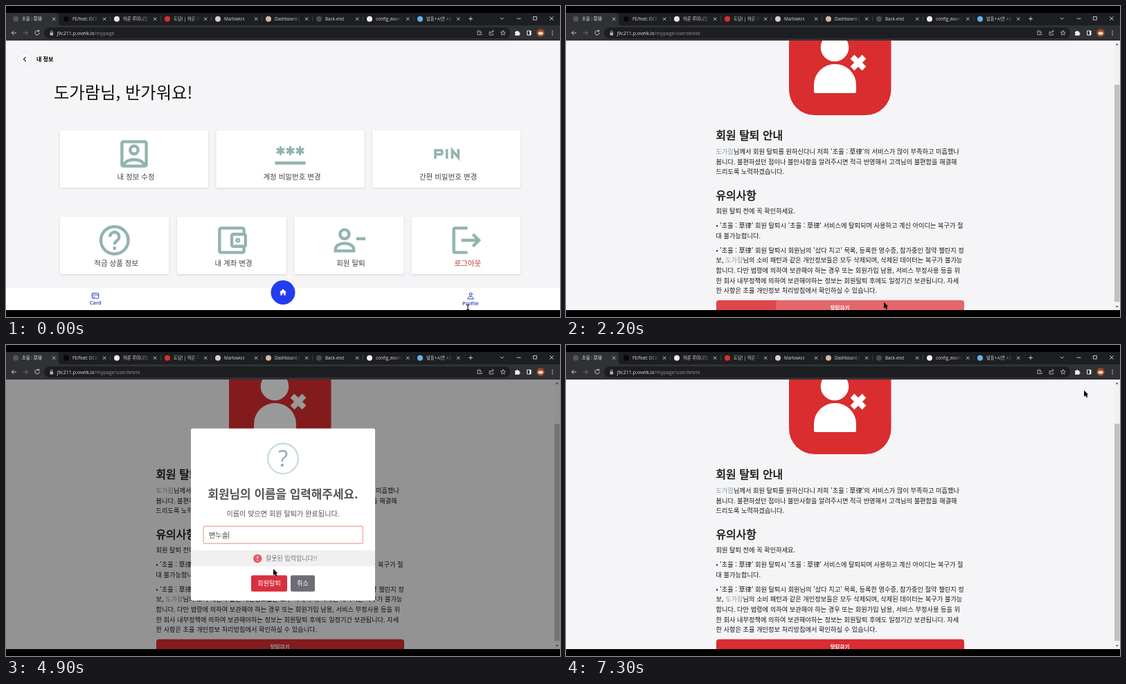
An HTML page that plays this animation: 800x450 px, repeating every 7.4 s.

```html
<!DOCTYPE html>
<html lang="ko">
<head>
<meta charset="utf-8">
<style>
html, body { margin: 0; width: 100%; height: 100%; overflow: hidden; background: #000; }
svg { display: block; font-family: "Noto Sans CJK KR", "Noto Sans CJK", "Noto Sans", sans-serif; }
#stage { width: 100vw; height: 100vh; }
text { white-space: pre; }
.ui { font-family: "Open Sans", "Noto Sans CJK KR", sans-serif; }
.mid { text-anchor: middle; }
.line { fill: none; stroke-linecap: round; stroke-linejoin: round; }
.copy { font-size: 9.23px; fill: #1a1a1a; }
.head { font-size: 15.9px; fill: #111; stroke: #111; stroke-width: .45px; }
.name { fill: #85a09b; }
.icon { fill: none; stroke: #92b4af; stroke-width: 2; }
.card { fill: #fff; filter: drop-shadow(0 1px 1.5px #0002); }

#home, #leave, #press, #cursor, #arrow, #beam, #scroll, #thumb, #shade, #modal, .err, .ok, .up, .down {
  animation: 7.4s linear infinite;
}
#home { animation-name: home; animation-timing-function: step-end; }
#leave { animation-name: leave; animation-timing-function: step-end; }
#beam { animation-name: beam; animation-timing-function: step-end; }
#arrow { animation-name: arrow; animation-timing-function: step-end; }
#press { animation-name: press; animation-timing-function: step-end; }
.err { animation-name: err; animation-timing-function: step-end; }
.ok { animation-name: ok; animation-timing-function: step-end; }
.up { animation-name: up; animation-timing-function: step-end; }
.down { animation-name: down; animation-timing-function: step-end; }
#scroll { animation-name: scroll; animation-timing-function: ease-in-out; }
#thumb { animation-name: thumb; animation-timing-function: ease-in-out; }
#cursor { animation-name: cursor; animation-timing-function: ease-in-out; }
#shade { animation-name: shade; }
#modal { animation-name: modal; transform-origin: 400px 245px; }

@keyframes home { 0% { opacity: 1 } 9.46%, 100% { opacity: 0 } }
@keyframes leave { 0% { opacity: 0 } 9.46%, 100% { opacity: 1 } }
@keyframes beam { 0% { opacity: 1 } 2%, 100% { opacity: 0 } }
@keyframes arrow { 0% { opacity: 0 } 2%, 100% { opacity: 1 } }
@keyframes press { 0% { opacity: 0 } 29% { opacity: 1 } 30.95%, 100% { opacity: 0 } }
@keyframes err { 0% { opacity: 0 } 59.4%, 100% { opacity: 1 } }
@keyframes ok { 0% { opacity: 1 } 59.4%, 100% { opacity: 0 } }
@keyframes up { 0% { transform: none } 59.4%, 100% { transform: translateY(-16px) } }
@keyframes down { 0% { transform: none } 59.4%, 100% { transform: translateY(16px) } }
@keyframes scroll { 0%, 23.6% { transform: none } 27.7%, 100% { transform: translateY(-60px) } }
@keyframes thumb { 0%, 23.6% { transform: none } 27.7%, 100% { transform: translateY(53px) } }
@keyframes shade { 0%, 30.95% { opacity: 0 } 32.3%, 78.4% { opacity: 1 } 79.8%, 100% { opacity: 0 } }
@keyframes modal {
  0%, 30.9% { opacity: 0; transform: scale(.7) }
  30.95% { opacity: 1; transform: scale(.7) }
  32.8% { transform: scale(1.05) }
  34.2% { transform: scale(.95) }
  35%, 78.4% { opacity: 1; transform: none }
  80.4%, 100% { opacity: 0; transform: scale(.5) }
}
@keyframes cursor {
  0%, 1.3% { transform: translate(667px, 431px) }
  7.5%, 12.2% { transform: translate(497px, 354px) }
  19%, 23% { transform: translate(618.5px, 304.5px) }
  29%, 52.7% { transform: translate(459px, 428.5px) }
  58.1%, 70% { transform: translate(386px, 324px) }
  77%, 85% { transform: translate(391.5px, 333.5px) }
  96%, 100% { transform: translate(748px, 65.5px) }
}
</style>
</head>
<body>
<svg id="stage" viewBox="0 0 800 450">
  <defs>
    <linearGradient id="fade"><stop stop-color="#1d1e21" stop-opacity="0"/><stop offset="1" stop-color="#1d1e21"/></linearGradient>
  </defs>
  <rect width="800" height="450"/>

  <svg y="50" width="800" height="390" viewBox="0 50 800 390">
    <rect y="50" width="800" height="390" fill="#f5f4f6"/>
    <g id="home">
      <circle cx="27" cy="77" r="10" fill="#f7f6f8" stroke="#e6e5e8"/>
      <path class="line" d="M28.3 74.2 25.5 77l2.8 2.8" stroke="#222" stroke-width="1.2"/>
      <text x="44" y="79.8" font-size="8" font-weight="700">내 정보</text>
      <text x="69" y="133.5" font-size="24.3" fill="#111">도가람님, 반가워요!</text>
      <g id="cards"></g>
      <rect y="408" width="800" height="32" fill="#fff"/>
      <circle cx="400" cy="414.5" r="17.5" fill="#223cf0"/>
      <path d="M400 409.5l-5.2 4.8h1.5v4.2h2.6v-3h2.2v3h2.6v-4.2h1.5z" fill="#fff"/>
      <g class="line" stroke="#2a3ec4">
        <rect x="124.3" y="415.5" width="9.5" height="7.5" rx="1"/>
        <path d="M124.3 418h9.5M126 421h2"/>
        <circle cx="671" cy="417" r="2"/>
        <path d="M666.8 423.5c0-4.2 8.4-4.2 8.4 0z"/>
      </g>
      <g class="ui mid" font-size="7.5" fill="#2a3ec4" font-weight="600">
        <text x="129.3" y="432">Card</text><text x="670.8" y="432.8">Profile</text>
      </g>
    </g>

    <g id="leave">
      <rect y="50" width="800" height="390" fill="#f5f4f6"/>
      <g id="scroll">
        <circle cx="212.5" cy="63" r="10" fill="#f7f6f8" stroke="#e6e5e8"/>
        <path class="line" d="M213.8 60.2 211 63l2.8 2.8" stroke="#222" stroke-width="1.2"/>
        <text x="229" y="65.8" font-size="8" font-weight="700">회원 탈퇴</text>
        <rect x="322" y="67.5" width="147.5" height="150.5" rx="37" fill="#d92d2f"/>
        <g fill="#fff">
          <circle cx="388" cy="120" r="20.3"/>
          <path d="M358 184v-10a30.5 30 0 0 1 61 0v10q0 2-2 2h-57q-2 0-2-2z"/>
          <path d="M413.5 133.5l17 17m0-17-17 17" stroke="#fff" stroke-width="8.2"/>
        </g>
        <g id="copy"></g>
        <rect x="217" y="485.7" width="358" height="23" rx="4" fill="#d92d33"/>
        <text class="mid" x="395.5" y="500" font-size="7.5" font-weight="700" fill="#fff">탈퇴하기</text>
        <g id="press" fill="#fff">
          <rect x="217" y="485.7" width="86" height="23" rx="4" opacity=".12"/>
          <rect x="303" y="485.7" width="272" height="23" rx="4" opacity=".28"/>
        </g>
      </g>
      <rect x="791.5" y="50" width="8.5" height="390" fill="#f1f1f1"/>
      <rect id="thumb" x="792" y="61" width="7.5" height="314" fill="#c1c1c1"/>
      <path d="M793.8 56.5h4l-2-2.5zM793.8 434h4l-2 2.5z" fill="#555"/>
    </g>

    <rect id="shade" y="50" width="800" height="390" fill="#000" fill-opacity=".4"/>
    <g id="modal">
      <rect class="ok" x="267" y="136.7" width="266" height="216.5" rx="2.5" fill="#fff"/>
      <rect class="err" x="267" y="120.7" width="266" height="249" rx="2.5" fill="#fff"/>
      <g class="up mid">
        <circle cx="400" cy="180.3" r="21.8" fill="none" stroke="#c9dcdf" stroke-width="2.3"/>
        <text x="400" y="192" font-size="33" fill="#87adb2" font-family="Open Sans, sans-serif">?</text>
        <text x="400" y="237.5" font-size="16.9" font-weight="700" fill="#545454">회원님의 이름을 입력해주세요.</text>
        <text x="400" y="263.7" font-size="10.15" fill="#545454">이름이 맞으면 회원 탈퇴가 완료됩니다.</text>
        <rect class="ok" x="285" y="278" width="230.5" height="25.3" rx="2" fill="#fff" stroke="#b4d0de" stroke-width="2.2"/>
        <rect class="err" x="285.2" y="278.3" width="230" height="25" rx="2" fill="#fff" stroke="#eeb3a9" stroke-width="1.4"/>
        <text x="293" y="294.8" font-size="10.15" fill="#444" style="text-anchor:start"><tspan id="done"></tspan><tspan id="composing" text-decoration="underline"></tspan></text>
        <rect id="caret" y="286" width=".7" height="10.5" fill="#333"/>
      </g>
      <g class="err">
        <rect x="267" y="297" width="266" height="23.3" fill="#f0f0f0"/>
        <circle cx="363.2" cy="309" r="6.2" fill="#e85a62"/>
        <path d="M363.2 305.6v4" stroke="#fff" stroke-width="1.3"/><circle cx="363.2" cy="311.8" r=".8" fill="#fff"/>
        <text x="375" y="312.2" font-size="9" fill="#777">잘못된 입력입니다!!</text>
      </g>
      <g class="down mid" font-size="9.15" fill="#fff">
        <rect x="354" y="317.3" width="52" height="23.5" rx="2.3" fill="#d9303f"/>
        <text x="380" y="332.2">회원탈퇴</text>
        <rect x="411" y="317.3" width="35" height="23.5" rx="2.3" fill="#6e6d76"/>
        <text x="428.5" y="332.2">취소</text>
      </g>
    </g>
  </svg>

  <rect y="10" width="800" height="18" fill="#1d1e21"/>
  <path d="M0 10H72q4 0 4 4v10q0 4 4 4H800V50H0z" fill="#303135"/>
  <path d="M76 10H800V28H80q-4 0-4-4V14q0-4-4-4z" fill="#1d1e21"/>
  <g id="tabs" class="ui" font-size="6.3" fill="#dcdcde"></g>
  <g class="line" stroke="#d8d8da" stroke-width=".9">
    <path d="M668.5 18.5h5m-2.5-2.5v5M714 17l2.3 2.3 2.3-2.3M738 18.2h5M785.5 15.5l5 5m0-5-5 5"/>
    <rect x="761.8" y="15.5" width="4.6" height="4.6"/>
    <path d="M14.5 39H8.3m2.8-2.8L8.3 39l2.8 2.8M47.5 36.5a3.2 3.2 0 1 0 .8 2.5m-.6-4.2v2h-2"/>
    <path d="M25 39h6.2m-2.8-2.8 2.8 2.8-2.8 2.8" stroke="#77787c"/>
  </g>
  <rect x="55" y="31" width="673" height="16" rx="8" fill="#1d1e21"/>
  <rect x="63.5" y="38.5" width="4.6" height="4" rx=".5" fill="#b5b6b9"/>
  <g class="line" stroke="#b5b6b9" stroke-width=".9">
    <path d="M64.5 38.5v-1.2a1.3 1.3 0 0 1 2.6 0v1.2"/>
    <path d="M684 36h-3v5.5h6V40m-2-4v3m-1.3-1.2 1.3 1.3 1.3-1.3M700 37.5h-2v4.5h5.5v-2m-3.5 0c0-2.5 1.5-3.5 4-3.5m-1.5-1.5 1.5 1.5-1.5 1.5"/>
    <path d="M717.7 35.5l1 2.3 2.5.2-1.9 1.7.6 2.4-2.2-1.3-2.2 1.3.6-2.4-1.9-1.7 2.5-.2z"/>
  </g>
  <text class="ui" x="73.5" y="41.7" font-size="7.05" fill="#e4e4e6">j9c211.p.ovelk.io<tspan id="path" fill="#8e9094"></tspan></text>
  <path d="M735 37h2a1.2 1.2 0 0 1 2.4 0h2v2a1.2 1.2 0 0 1 0 2.4v1.4h-6.4v-2a1.2 1.2 0 0 0 0-2z" fill="#eee"/>
  <path d="M752.5 36h5.5v6h-5.5z" fill="none" stroke="#eee"/><path d="M756 36h2v6h-2z" fill="#eee"/>
  <circle cx="772" cy="39" r="5.7" fill="#a54b24"/><ellipse cx="772" cy="39.5" rx="3.6" ry="2.3" fill="#ecd9c6"/>
  <g fill="#d8d8da"><circle cx="789" cy="36.3" r=".8"/><circle cx="789" cy="39" r=".8"/><circle cx="789" cy="41.7" r=".8"/></g>

  <g id="cursor">
    <path id="beam" d="M-2 1.5h4M0 1.5v7M-2 8.5h4" stroke="#111" stroke-width="1.2"/>
    <path id="arrow" d="M0 0v9.2l2-1.7 1.5 3 1.8-.8-1.4-3 2.6-.2z" fill="#0a0a0a"/>
  </g>
</svg>
<script>
const $ = id => document.getElementById(id);
const NAME = '<tspan class="name">도가람</tspan>';
const BRAND = "'초율 : 草律'";

const tabs = [
  ['#55565a', '초율 : 草律'], ['#08080a', 'FE/feat: OCR 인식'], ['#eeeeee', '하론 루미나탭 구매'],
  ['#d5302f', '도담! | 하론 루미'], ['#d4d4d4', 'Marlowick'], ['#d9b9a6', 'Dashboard [Jenk'],
  ['#4b4c50', 'Back-end'], ['#f2f2f2', 'config_example'], ['#62b4e6', '발표+시연 시나리']
];
$('tabs').innerHTML = tabs.map(([color, title], i) => {
  const x = 14 + i * 73;
  const fade = i ? `<rect x="${x + 34}" y="12" width="13" height="14" fill="url(#fade)"/>
    <rect x="${x + 47}" y="12" width="24" height="14" fill="#1d1e21"/>` : '';
  const divider = i && i < 8 ? `<path d="M${x + 63.5} 14.5v8" stroke="#4c4d51" stroke-width=".7"/>` : '';
  return `<circle cx="${x}" cy="18.7" r="4" fill="${color}"/><text x="${x + 9}" y="21">${title}</text>${fade}
    <path class="line" d="M${x + 53.3} 16.8l3.8 3.8m0-3.8-3.8 3.8" stroke="#d8d8da" stroke-width=".9"/>${divider}`;
}).join('');

const star = x => [0, 60, 120].map(a => `<path d="M${x} 7v5.8" stroke-width="1.5" transform="rotate(${a} ${x} 9.9)"/>`).join('');
// Icons use a 24-unit grid centred on the card.
const cards = [
  [78, 180, 214, '내 정보 수정', '<rect x="4" y="4" width="16" height="16" rx="1"/><circle cx="12" cy="9.4" r="2.6"/><path d="M5 19.5c2-5 12-5 14 0"/>'],
  [303.5, 180, 214, '계정 비밀번호 변경', star(5.6) + star(12) + star(18.4) + '<path d="M2 18h20"/>'],
  [529, 180, 214, '간편 비밀번호 변경', '<path d="M4.7 15.2V9.6h3.5q1 0 1 1v.7q0 1-1 1H4.7M12.3 8.8v6.4M15.8 15.2V9.6l4 4.8V8.8" stroke-width="1.6"/>'],
  [78, 305, 157.5, '적금 상품 정보', '<circle cx="12" cy="12" r="9"/><path d="M9 9.8a3 3 0 1 1 4.6 2.4c-1 .7-1.6 1.2-1.6 2.5M12 16.2v2"/>'],
  [247, 305, 158, '내 계좌 변경', '<rect x="4" y="4" width="16" height="16" rx="1"/><rect x="12" y="8" width="9" height="8" rx="1" fill="#fff"/><circle cx="16" cy="12" r="1" stroke-width="1.2"/>'],
  [416.5, 305, 158, '회원 탈퇴', '<circle cx="9" cy="8" r="3"/><path d="M3 19v-1c0-3 4-4 6-4s6 1 6 4v1zM16.7 11h6"/>'],
  [585.5, 305, 157.5, '로그아웃', '<path d="M13 4H5q-1 0-1 1v14q0 1 1 1h8M9 12h11M16.5 8l4 4-4 4"/>']
];
$('cards').innerHTML = cards.map(([x, y, w, label, art]) => {
  const cx = x + w / 2;
  return `<rect class="card" x="${x}" y="${y}" width="${w}" height="83" rx="2"/>
    <g class="icon" transform="translate(${cx - 26.4} ${y + 7.6}) scale(2.2)">${art}</g>
    <text class="mid" x="${cx + 2.5}" y="${y + 70.8}" font-size="10.5" fill="${label === '로그아웃' ? '#c4312e' : '#444'}">${label}</text>`;
}).join('');

const copy = [
  [253, '회원 탈퇴 안내', 'head'],
  [273.8, `${NAME}님께서 회원 탈퇴를 원하신다니 저희 ${BRAND}의 서비스가 많이 부족하고 미흡했나`],
  [288.5, '봅니다. 불편하셨던 점이나 불만사항을 알려주시면 적극 반영해서 고객님의 불편함을 해결해'],
  [303.2, '드리도록 노력하겠습니다.'],
  [339.6, '유의사항', 'head'],
  [360.3, '회원 탈퇴 전에 꼭 확인하세요.'],
  [381.3, `• ${BRAND} 회원 탈퇴시 ${BRAND} 서비스에 탈퇴되며 사용하고 계신 아이디는 복구가 절`],
  [395.8, '대 불가능합니다.'],
  [416.8, `• ${BRAND} 회원 탈퇴시 회원님의 '샀다 치고' 목록, 등록한 영수증, 참가중인 절약 챌린지 정`],
  [431.4, `보, ${NAME}님의 소비 패턴과 같은 개인정보들은 모두 삭제되며, 삭제된 데이터는 복구가 불가능`],
  [446, '합니다. 다만 법령에 의하여 보관해야 하는 경우 또는 회원가입 남용, 서비스 부정사용 등을 위'],
  [460.6, '한 회사 내부정책에 의하여 보관해야하는 정보는 회원탈퇴 후에도 일정기간 보관됩니다. 자세'],
  [475.2, '한 사항은 초율 개인정보 처리방침에서 확인하실 수 있습니다.']
];
$('copy').innerHTML = copy.map(([y, text, kind = 'copy']) => `<text class="${kind}" x="216.5" y="${y}">${text}</text>`).join('');

// Syllables as the input method composes them: time, finished part, composing part.
const typing = [
  [0, '', ''], [2900, '', 'ㅂ'], [3000, '', '벼'], [3100, '', '변'], [3300, '변', 'ㄴ'], [3400, '변', '누'],
  [3500, '변누', 'ㅅ'], [3600, '변누', '소'], [3800, '변누', '솔'], [4400, '변누솔', '']
];
const clock = $('cursor').getAnimations()[0];
function render() {
  const t = (clock.currentTime || 0) % 7400;
  const [, done, composing] = typing.findLast(([start]) => t >= start);
  $('done').textContent = done;
  $('composing').textContent = composing;
  $('caret').setAttribute('x', 293.4 + (done + composing).length * 9.34);
  $('path').textContent = t < 700 ? '/mypage' : '/mypage/userdelete';
  requestAnimationFrame(render);
}
render();
</script>
</body>
</html>
```
